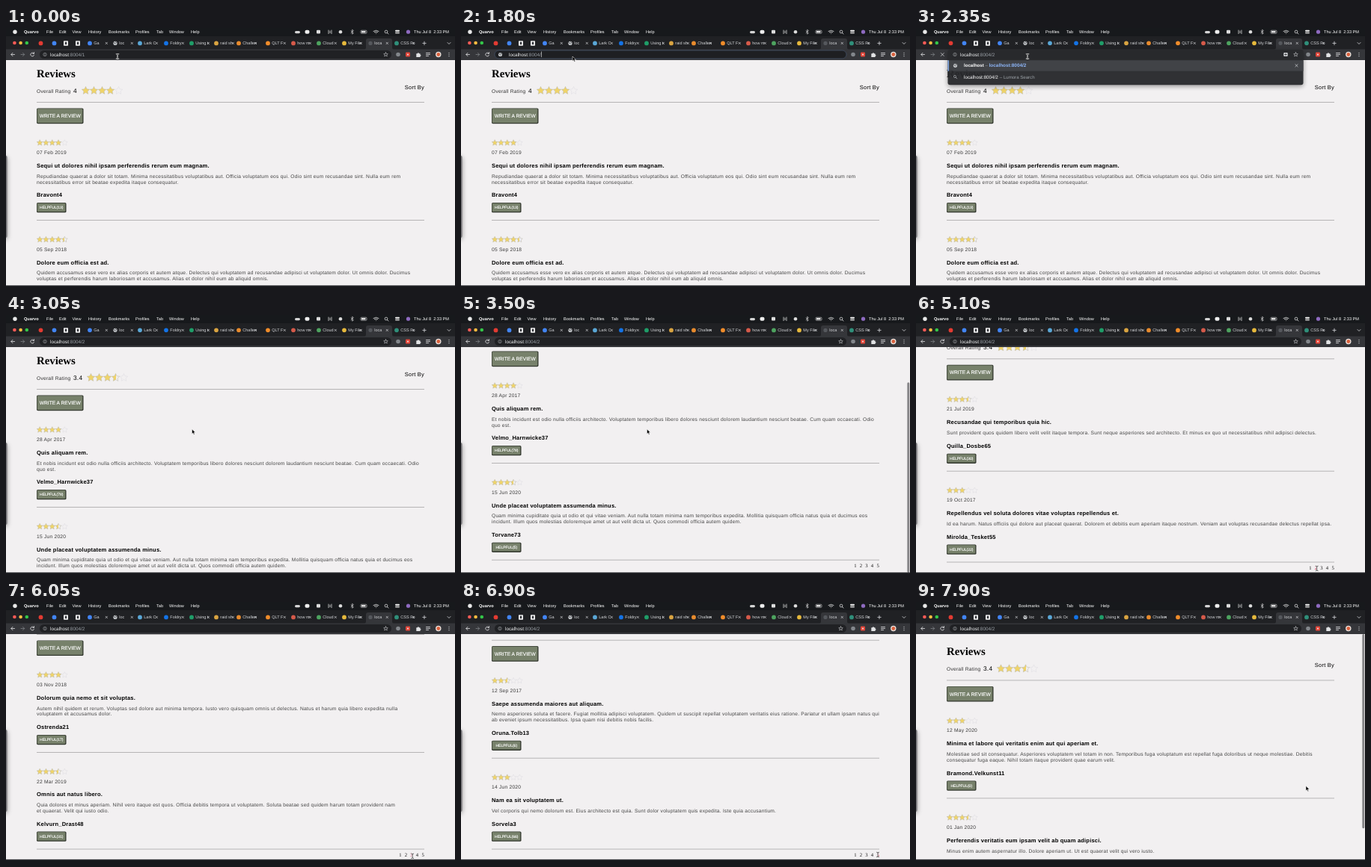
These frames come from a looping animation (600 by 347 pixels, 8 s). An HTML page:

```html
<!DOCTYPE html>
<html lang="en">
<head>
<meta charset="utf-8">
<title>Reviews</title>
<style>
html, body { margin: 0; width: 100%; height: 100%; overflow: hidden; background: #f2f0f1; }
svg { display: block; width: 600px; height: 347px; }
text { font-family: "Liberation Sans", Arial, sans-serif; text-rendering: geometricPrecision; white-space: pre; }
.serif { font-family: "Liberation Serif", serif; }
.spaced { letter-spacing: .23px; }
.title { letter-spacing: .205px; font-weight: bold; }
.bold { font-weight: bold; }
.shadow { filter: drop-shadow(0 2px 3px rgba(0, 0, 0, .4)); }
</style>
</head>
<body>
<svg id="stage" viewBox="0 0 600 347">
  <defs>
    <linearGradient id="half"><stop offset=".5" stop-color="#f0d468"/><stop offset=".5" stop-color="#f2f0f1"/></linearGradient>
  </defs>
</svg>
<script>
const LOOP = 8000, TICK = 50, LINE = 7.7, REVIEW = 129.6;
const stage = document.getElementById('stage');

function el(name, attrs, parent = stage) {
  const node = document.createElementNS('http://www.w3.org/2000/svg', name);
  for (const key in attrs) node.setAttribute(key, attrs[key]);
  return parent.appendChild(node);
}
const group = (parent, attrs = {}) => el('g', attrs, parent);
const rect = (p, x, y, width, height, fill, rx = 0) => el('rect', { x, y, width, height, fill, rx }, p);
const dot = (p, cx, cy, r, fill) => el('circle', { cx, cy, r, fill }, p);
const stroke = (p, d, color, width = .8) =>
  el('path', { d, fill: 'none', stroke: color, 'stroke-width': width, 'stroke-linecap': 'round' }, p);
function label(p, x, y, size, fill, text, cls = '', anchor = 'start') {
  const node = el('text', { x, y, 'font-size': size, fill, class: cls, 'text-anchor': anchor }, p);
  node.textContent = text;
  return node;
}
const show = (node, on) => { node.style.display = on ? '' : 'none'; };
const cross = (p, x, y, r, color) =>
  stroke(p, `M${x - r} ${y - r}l${2 * r} ${2 * r}M${x + r} ${y - r}l${-2 * r} ${2 * r}`, color, .7);
function globe(p, x, y) {
  dot(p, x, y, 2.6, '#c8cbce');
  stroke(p, `M${x - 1.6} ${y - .8}q1.5 .2 1.8 1.6M${x + .6} ${y - 1.8}l1 1.4`, '#2b2c30', .8);
}

// Page content
const pages = [
  { rating: 4, reviews: [
    [4, '07 Feb 2019', 'Sequi ut dolores nihil ipsam perferendis rerum eum magnam.', 'Bravont4', 13,
      'Repudiandae quaerat a dolor sit totam. Minima necessitatibus voluptatibus aut. Officia voluptatum eos qui. Odio sint eum recusandae sint. Nulla eum rem',
      'necessitatibus error sit beatae expedita itaque consequatur.'],
    [4.5, '05 Sep 2018', 'Dolore eum officia est ad.', 'Tulvern8', 4,
      'Quidem accusamus esse vero ex alias corporis et autem atque. Delectus qui voluptatem ad recusandae adipisci ut voluptatem dolor. Ut omnis dolor. Ducimus',
      'voluptas et perferendis harum laboriosam et accusamus. Alias et dolor nihil eum ab aliquid omnis.']] },
  { rating: 3.4, reviews: [
    [4, '28 Apr 2017', 'Quis aliquam rem.', 'Velmo_Harnwicke37', 78,
      'Et nobis incidunt est odio nulla officiis architecto. Voluptatem temporibus libero dolores nesciunt dolorem laudantium nesciunt beatae. Cum quam occaecati. Odio',
      'quo est.'],
    [3.5, '15 Jun 2020', 'Unde placeat voluptatem assumenda minus.', 'Torvane73', 5,
      'Quam minima cupiditate quia ut odio et qui vitae veniam. Aut nulla totam minima nam temporibus expedita. Mollitia quisquam officia natus quia et ducimus eos',
      'incidunt. Illum quos molestias doloremque amet ut aut velit dicta ut. Quos commodi officia autem quidem.']] },
  { rating: 3.4, reviews: [
    [3.5, '21 Jul 2019', 'Recusandae qui temporibus quia hic.', 'Quilla_Dosbe65', 30,
      'Sunt provident quos quidem libero velit velit itaque tempora. Sunt neque asperiores sed architecto. Et minus ex quo ut necessitatibus nihil adipisci delectus.'],
    [3, '19 Oct 2017', 'Repellendus vel soluta dolores vitae voluptas repellendus et.', 'Mirolda_Tesket55', 22,
      'Id ea harum. Natus officiis qui dolore aut placeat quaerat. Dolorem et debitis eum aperiam itaque nostrum. Veniam aut voluptas recusandae delectus repellat ipsa.']] },
  { rating: 3.4, reviews: [
    [4, '03 Nov 2018', 'Dolorum quia nemo et sit voluptas.', 'Ostrenda21', 17,
      'Autem nihil quidem et rerum. Voluptas sed dolore aut minima tempora. Iusto vero quisquam omnis ut delectus. Natus et harum quia libero expedita nulla',
      'voluptatem et accusamus dolor.'],
    [3.5, '22 Mar 2019', 'Omnis aut natus libero.', 'Kelvurn_Drast48', 31,
      'Quia dolores et minus aperiam. Nihil vero itaque est quos. Officia debitis tempora ut voluptatem. Soluta beatae sed quidem harum totam provident nam',
      'et quaerat. Velit qui iusto odio.']] },
  { rating: 3.4, reviews: [
    [2.5, '12 Sep 2017', 'Saepe assumenda maiores aut aliquam.', 'Oruna.Tolb13', 6,
      'Nemo asperiores soluta et facere. Fugiat mollitia adipisci voluptatem. Quidem ut suscipit repellat voluptatem veritatis eius ratione. Pariatur et ullam ipsam natus qui',
      'ab eveniet ipsum necessitatibus. Ipsa quam nisi debitis nobis facilis.'],
    [3, '14 Jun 2020', 'Nam ea sit voluptatem ut.', 'Sorvela3', 66,
      'Vel corporis qui nemo dolorum est. Eius architecto est quia. Sunt dolor voluptatem quis expedita. Iste quia accusantium.']] },
  { rating: 3.4, reviews: [
    [3, '12 May 2020', 'Minima et labore qui veritatis enim aut qui aperiam et.', 'Bramond.Velkunst11', 0,
      'Molestiae sed sit consequatur. Asperiores voluptatem vel totam in non. Temporibus fuga voluptatum est repellat fuga doloribus ut neque molestiae. Debitis',
      'consequatur fuga eaque. Nihil totam itaque provident quae earum velit.'],
    [3.5, '01 Jan 2020', 'Perferendis veritatis eum ipsam velit ab quam adipisci.', 'Hestrivo52', 9,
      'Minus enim autem aspernatur illo. Dolore aperiam ut. Ut est quaerat velit qui vero iusto.']] }
];

function stars(p, x, y, pitch, rating) {
  const filled = Math.round(rating * 2) / 2;
  for (let i = 0; i < 5; i++) {
    const points = Array.from({ length: 10 }, (_, k) => {
      const r = pitch * (k % 2 ? .24 : .5), a = k * Math.PI / 5;
      return [x + pitch * (i + .5) + r * Math.sin(a), y + pitch * .04 - r * Math.cos(a)].map(v => v.toFixed(2));
    });
    const full = i + 1 <= filled, part = !full && i < filled;
    el('polygon', { points: points.join(' '), fill: full ? '#f0d468' : part ? 'url(#half)' : '#f2f0f1',
      stroke: full || part ? '#bcb9ae' : '#dedde2', 'stroke-width': .55 }, p);
  }
}
function button(p, y, w, h, size, text) {
  rect(p, 41, y, w, h, '#33382f', 1.6);
  rect(p, 41.7, y + .7, w - 2, h - 2, '#77816b', 1);
  const caption = label(p, 41 + w / 2, y + h / 2 + size * .34, size, '#fff', text, '', 'middle');
  caption.setAttribute('stroke', '#fff');
  caption.setAttribute('stroke-width', .15);
}
const rule = (p, y) => rect(p, 41, y - .3, 518, .7, '#9c9b9c');

function addReview(p, y, [rating, date, title, name, helpful, ...lines]) {
  stars(p, 41, y, 8.3, rating);
  label(p, 41, y + 15.6, 6.67, '#3a3a3a', date, 'spaced');
  label(p, 41, y + 33.5, 7.5, '#000', title, 'title');
  lines.forEach((line, i) => label(p, 41, y + 47.3 + i * LINE, 6.67, '#444', line, 'spaced'));
  const end = y + (lines.length - 2) * LINE;
  label(p, 41, end + 72.8, 7.5, '#000', name, 'title');
  button(p, end + 80.6, 39.5, 13.2, 5, `HELPFUL(${helpful})`);
  rule(p, end + 104);
  return end + REVIEW;
}

rect(stage, 0, 0, 600, 347, '#f2f0f1');
const content = group(stage);
for (const page of pages) {
  const g = page.node = group(content);
  label(g, 41, 66, 14.8, '#000', 'Reviews', 'serif bold');
  label(g, 41, 87, 6.67, '#333', 'Overall Rating', 'spaced');
  label(g, 90, 87, 8.3, '#000', page.rating, 'spaced');
  stars(g, page.rating % 1 ? 108 : 101, 83.5, 11, page.rating);
  label(g, 559, 82.1, 7.5, '#000', 'Sort By', 'spaced', 'end');
  rule(g, 99.5);
  button(g, 107.5, 62.5, 20.7, 6.67, 'WRITE A REVIEW');
  let y = 153.5;
  for (const review of page.reviews) y = addReview(g, y, review);
  page.max = y - 25.6 - 331;
  page.numbers = [1, 2, 3, 4, 5].map(n =>
    label(g, 519.3 + n * 7.55, y - 25.6 + 10, 6.67, '#111', n, 'serif', 'middle'));
}
const thumb = rect(stage, 596.3, 43, 3, 250, '#858487', 1.5);
rect(stage, -8, 171, 9.6, 110, '#77767a', 2).setAttribute('class', 'shadow');
rect(stage, 0, 344.8, 600, 3, '#25262a');

// Menu bar
rect(stage, 0, 0, 600, 11, '#17191c');
dot(stage, 12, 5.2, 2.7, '#e8e8e8');
label(stage, 24, 7.2, 5.6, '#fff', 'Quarvo', 'bold');
const menu = { File: 54, Edit: 71, View: 88.5, History: 110, Bookmarks: 137, Profiles: 173, Tab: 201, Window: 218, Help: 247 };
for (const name in menu) label(stage, menu[name], 7.2, 5.6, '#fff', name);
rect(stage, 386, 4, 7, 3.2, '#d5d5d5', 1.6);
rect(stage, 399.5, 2.8, 6, 5, '#eee', 2);
rect(stage, 415, 2.8, 5, 4.8, '#ddd', 1);
stroke(stage, 'M431 3v4.6M433 4v2.6M435 3v4.6', '#ddd');
dot(stage, 447, 5.2, 2.3, '#ddd');
stroke(stage, 'M461 3.8l3.4 3-1.7 1.4V2.2l1.7 1.4-3.4 3', '#eee', .6);
el('rect', { x: 474, y: 3.2, width: 8, height: 4, rx: 1, fill: 'none', stroke: '#ddd', 'stroke-width': .6 });
rect(stage, 475, 4, 5.5, 2.4, '#ddd');
stroke(stage, 'M491 4.4q3.5-2.6 7 0M492.4 5.8q2.1-1.6 4.2 0M494.4 7.2h.2', '#eee');
el('circle', { cx: 508, cy: 5, r: 1.9, fill: 'none', stroke: '#eee', 'stroke-width': .7 });
stroke(stage, 'M509.4 6.4l1.6 1.6', '#eee');
rect(stage, 520, 2.8, 6, 2, '#eee', 1);
rect(stage, 520, 5.5, 6, 2, '#bbb', 1);
dot(stage, 537.5, 5.2, 2.6, '#8e6ac0');
label(stage, 592, 7.2, 5.6, '#fff', 'Thu Jul 8  2:33 PM', '', 'end');

// Tab strip
rect(stage, 0, 11, 600, 18, '#202124');
['#fc5b57', '#fdbc40', '#34c749'].forEach((color, i) => dot(stage, 11.4 + i * 8.2, 20, 2.3, color));
el('path', { d: 'M478 29q3 0 3-3v-9q0-3 3-3h29q3 0 3 3v9q0 3 3 3z', fill: '#35363a' });
dot(stage, 46.5, 20.4, 2.9, '#e33b32');
dot(stage, 64.5, 20.4, 2.9, '#4285f4');
for (const x of [80, 96]) {
  rect(stage, x - 3, 17.3, 6, 6.4, '#f0f0f0', .6);
  rect(stage, x - 1.2, 18.7, 2.4, 3.4, '#33353a');
}
const tabs = [
  [112, '#4285f4', 'Ga'], [146, '', 'loc'], [179, '#5aa7d6', 'Lark C'], [214, '#1473e6', 'Foldry'],
  [248, '#1f9d68', 'Using t'], [281, '#d9a441', 'raid sh'], [311, '#e88b2d', 'Challen'], [350, '#f08c2a', 'QLT F'],
  [384, '#d65a4a', 'how m'], [418, '#4da35f', 'Cloud'], [452, '#e6b93c', 'My File'], [487, '', 'loca'], [522, '#2f8f7a', 'CSS Fo']
];
for (const [x, color, name] of tabs) {
  if (color) dot(stage, x, 20.4, 2.9, color);
  else if (x === 487) dot(stage, x, 20.4, 2.6, '#55585d');
  else globe(stage, x, 20.4);
  label(stage, x + 5.3, 22.4, 5.5, '#d8dadd', name);
  cross(stage, x + 22.3, 20.4, 1.2, '#d8dadd');
}
stroke(stage, 'M559 18.2v4.4M556.8 20.4h4.4', '#d8dadd');
stroke(stage, 'M590 19.5l2 2 2-2', '#d8dadd');

// Toolbar
rect(stage, 0, 28.5, 600, 14.5, '#35363a');
stroke(stage, 'M11.5 35.5H7M9 33.3L6.8 35.5 9 37.7', '#e2e3e5');
stroke(stage, 'M20 35.5h4.5M22.5 33.3l2.2 2.2-2.2 2.2', '#7d8085');
const reload = stroke(stage, 'M37 33.9a2.4 2.4 0 1 0 .5 2.4M37.5 32.6v1.8h-1.8', '#e2e3e5');
const stop = cross(stage, 35.3, 35.5, 2, '#e2e3e5');
dot(stage, 524, 35.5, 2.8, '#83878c');
rect(stage, 534, 32.6, 6, 6, '#e0463a', 1);
dot(stage, 537, 35.6, 1.1, '#f5d9d6');
el('path', { d: 'M548.3 34.3h1.6a1 1 0 1 1 2 0h1.6v1.4a1 1 0 1 1 0 2v1.2h-5.2z', fill: '#e2e3e5' });
stroke(stage, 'M561.5 33.5h5M561.5 35.5h5M561.5 37.5h3', '#e2e3e5');
dot(stage, 577.8, 35.5, 3.7, '#e9e4e0');
dot(stage, 577.8, 35.5, 2.4, '#d9603c');
[33.3, 35.5, 37.7].forEach(y => dot(stage, 592, y, .6, '#d5d7da'));

rect(stage, 45, 30, 470, 11, '#202124', 5.5);
const focus = el('rect', { x: 45, y: 30, width: 470, height: 11, rx: 5.5, fill: '#1e1f22', stroke: '#4a5a72', 'stroke-width': .7 });

const dropdown = group(stage, { class: 'shadow' });
rect(dropdown, 42.5, 29, 475, 47.3, '#292a2d', 3);
rect(dropdown, 42.5, 43.3, 475, 14.4, '#3a3c41');
rect(dropdown, 42.5, 43.3, 1.4, 14.4, '#8ab4f8');
globe(dropdown, 52.5, 50.3);
label(dropdown, 64, 52.4, 6.1, '#fff', 'localhost', 'bold');
label(dropdown, 92.6, 52.4, 6.1, '#9aa0a6', '–');
label(dropdown, 97.6, 52.4, 6.4, '#8ab4f8', 'localhost:8004/2', 'bold');
cross(dropdown, 508.5, 50.3, 1.6, '#d5d7da');
el('circle', { cx: 52, cy: 65, r: 1.6, fill: 'none', stroke: '#a4a8ac', 'stroke-width': .7 }, dropdown);
stroke(dropdown, 'M53.2 66.2l1.6 1.6', '#a4a8ac');
label(dropdown, 64, 67.6, 6.3, '#fff', 'localhost:8004/2');
label(dropdown, 111.8, 67.6, 6.1, '#9aa0a6', '– Lumora Search');

const info = group(stage);
el('circle', { cx: 52, cy: 35.5, r: 2.2, fill: 'none', stroke: '#a4a8ac', 'stroke-width': .6 }, info);
stroke(info, 'M52 35.3v1.2M52 34.3v.05', '#a4a8ac', .6);
const typing = group(stage);
globe(typing, 52.5, 35.5);
const selection = rect(stage, 59, 31.5, 46, 8, '#3f638b');
const host = label(stage, 59, 37.7, 6.35, '#f1f3f4', 'localhost');
const path = label(stage, 84.1, 37.7, 6.35, '#9aa0a6', '');
const caret = rect(stage, 105.3, 31.5, .6, 7.6, '#f1f3f4');
const bookmark = stroke(stage, 'M507.5 32.7l.8 1.9 2 .1-1.6 1.3.6 2-1.8-1.1-1.8 1.1.6-2-1.6-1.3 2-.1z', '#c4c7ca', .6);
const blocked = group(stage);
rect(blocked, 491.3, 33, 5.4, 5, '#d5d7da', 1);
stroke(blocked, 'M492.6 35.5h2.8M494 34v3', '#292a2d', .7);

// Pointers
const arrow = el('path', { d: 'M0 0v6.3l1.5-1.4 1 2.3 1.1-.5-1-2.2h2z', fill: '#000', stroke: '#fff', 'stroke-width': .5 });
const beam = group(stage);
for (const [color, width] of [['#fff', 1.5], ['#222', .7]])
  stroke(beam, 'M-1.5-3.3Q0-3.3 0-2.4V2.4Q0 3.3-1.5 3.3M1.5-3.3Q0-3.3 0-2.4M0 2.4Q0 3.3 1.5 3.3', color, width);

// Timeline: hard steps
const pageSteps = [[0, 0], [2450, 1], [5100, 2], [5750, 3], [6500, 4], [7250, 5]];
const urlSteps = [[0, 'idle'], [100, 'selected'], [750, 'caret'], [1150, 'blink'], [1700, 'edit'],
  [2050, 'suggest'], [2300, 'loading'], [2450, 'idle']];
const pointerSteps = [[0, 'beam'], [1700, 'arrow'], [2100, 'beam'], [2700, 'arrow'], [4500, 'beam'], [7350, 'arrow']];
const hoverSteps = [[0, 0], [4500, 1], [4800, 2], [5400, 3], [6150, 4], [6850, 5], [7350, 0]];
// Timeline: eased moves
const pointerMoves = [[0, 149, 38], [2600, 149, 38], [2850, 248.5, 153], [4000, 248.5, 153], [4350, 527, 338],
  [4650, 527, 338], [4850, 535.7, 339.5], [5250, 535.7, 339.5], [5400, 542, 340.5], [6000, 542, 340.5],
  [6200, 549.5, 339.5], [6700, 549.5, 339.5], [6900, 557, 338.5], [7250, 557, 338.5], [7500, 521, 246.5]];
const barMoves = [[0, 0], [3250, 0], [3300, 1], [4050, 1], [4350, 0], [7750, 0], [7800, 1]];

const hold = (steps, t) => steps.filter(s => s[0] <= t).pop()[1];
function tween(moves, t, ease = u => u) {
  const next = moves.findIndex(m => m[0] > t);
  if (next < 0) return moves[moves.length - 1].slice(1);
  const a = moves[next - 1], b = moves[next], u = ease((t - a[0]) / (b[0] - a[0]));
  return a.slice(1).map((v, i) => v + (b[i + 1] - v) * u);
}
const smooth = u => u * u * (3 - 2 * u);

function scrollAt(t, page) {
  if (t < 2450) return 0;
  if (t < 5100) return tween([[0, 0], [3250, 0], [3500, 59], [3600, 59], [3900, page.max]], t, smooth)[0];
  return tween([[0, page.max], [7750, page.max], [7900, -5.4]], t)[0];
}

function drawAddress(t) {
  const state = hold(urlSteps, t);
  const edit = state === 'edit' || state === 'suggest';
  const x = edit ? 64 : 59;
  host.setAttribute('x', x);
  path.setAttribute('x', x + 25.1);
  path.textContent = ':8004/' + (t < 1700 ? '1' : state === 'edit' ? '' : '2');
  caret.setAttribute('x', state === 'caret' ? 105.3 : state === 'edit' ? 107 : 110.5);
  show(caret, state === 'caret' || edit);
  show(selection, state === 'selected');
  show(focus, t >= 100 && t < 2300);
  show(typing, edit);
  show(info, !edit);
  show(bookmark, state === 'idle' || state === 'loading');
  show(blocked, state === 'loading');
  show(stop, state === 'loading');
  show(reload, state !== 'loading');
  show(dropdown, t >= 2050 && t < 2400);
  dropdown.setAttribute('opacity', t < 2350 ? 1 : .96);
}

function draw(time) {
  const t = Math.floor(time % LOOP / TICK) * TICK;
  const page = pages[hold(pageSteps, t)], hover = hold(hoverSteps, t), scroll = scrollAt(t, page);
  pages.forEach(p => show(p.node, p === page));
  page.numbers.forEach((n, i) => n.setAttribute('fill', i + 1 === hover ? '#d3123f' : '#111'));
  content.setAttribute('transform', `translate(0 ${-scroll})`);

  const view = 302, ratio = view / (view + page.max);
  thumb.setAttribute('y', 43 + Math.max(0, Math.min(scroll, page.max)) * ratio);
  thumb.setAttribute('height', view * ratio);
  thumb.setAttribute('opacity', tween(barMoves, t)[0]);

  drawAddress(t);
  const kind = hold(pointerSteps, t), at = `translate(${tween(pointerMoves, t, smooth)})`;
  show(arrow, kind === 'arrow');
  show(beam, kind === 'beam');
  arrow.setAttribute('transform', at);
  beam.setAttribute('transform', at);
}

const start = performance.now();
function frame() {
  draw(performance.now() - start);
  requestAnimationFrame(frame);
}
frame();
</script>
</body>
</html>
```
